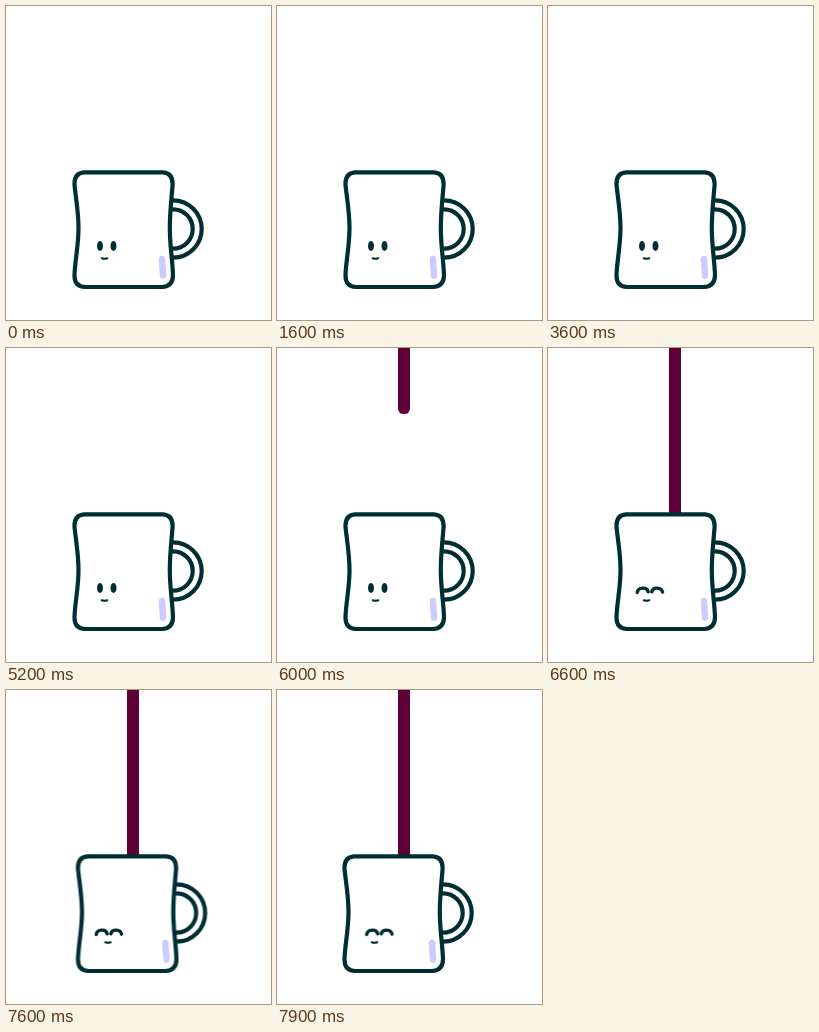
An HTML page without scripts for the animation above (8 s loop, 265x314 px).

```html
<!DOCTYPE html>
<html lang="en">
<head>
<meta charset="utf-8">
<title>Mug and straw</title>
<style>
  html, body { margin: 0; width: 100%; height: 100%; overflow: hidden; background: #fff; }
  svg { display: block; width: 265px; height: 314px; }

  .ink { fill: none; stroke: #002f33; stroke-width: 4.2; stroke-linecap: round; stroke-linejoin: round; }
  .body { fill: #fff; }
  .shine { stroke: #ccccff; stroke-width: 6.5; stroke-linecap: round; }
  .straw { stroke: #5f0038; stroke-width: 12; stroke-linecap: round; }
  .thin { stroke-width: 2; }
  .smile { stroke-width: 3.4; }
  .eyes { fill: #002f33; transform-origin: 101px 240px; }

  .straw, .mug, .gaze, .eyes, .open, .happy { animation: 8s linear infinite; }
  .straw { animation-name: drop; }
  .mug { animation-name: wobble; }
  .gaze { animation-name: gaze; }
  .eyes { animation-name: blink; }
  .open { animation-name: hide; animation-timing-function: step-end; }
  .happy { animation-name: show; animation-timing-function: step-end; }

  @keyframes drop {
    0%, 71.8% { transform: translateY(-8px); }
    75% { transform: translateY(66px); }
    78.75%, 100% { transform: translateY(180px); }
  }
  @keyframes wobble {
    0%, 86.25% { transform: none; }
    88.75% { transform: translateX(-3px); }
    90% { transform: translateX(-2.5px); }
    92.5% { transform: translateX(3.5px); }
    93.75% { transform: translateX(4.8px); }
    95% { transform: translateX(3.5px); }
    97.5% { transform: translateX(-.6px); }
    98.75%, 100% { transform: translateX(-1px); }
  }
  /* The smiling eyes trail the body a little. */
  @keyframes gaze {
    0%, 92% { transform: none; }
    95% { transform: translateX(-2.5px); }
    98.75%, 100% { transform: translateX(1.5px); }
  }
  @keyframes blink {
    0%, 35%, 39.5%, 77.5% { transform: none; }
    36.75%, 37.75% { transform: scaleY(.15); }
    78.75%, 100% { transform: scaleY(.2); }
  }
  @keyframes hide { 0% { opacity: 1; } 78.75%, 100% { opacity: 0; } }
  @keyframes show { 0% { opacity: 0; } 78.75%, 100% { opacity: 1; } }
</style>
</head>
<body>
<svg viewBox="0 0 265 314">
  <line class="straw" x1="127" y1="-300" x2="127" y2="-6"/>
  <g class="mug">
    <circle class="ink body" cx="167" cy="223" r="28.7"/>
    <circle class="ink body" cx="167" cy="223" r="19.7"/>
    <path class="ink body" d="M78 166.3H157Q167 167 166.6 179C165.5 193 163.8 206 163.8 222C163.8 240 166.5 254 167 269Q167 280.5 156 281H79Q68.3 280.5 68.5 269C69 254 72.5 240 72.5 222C72.5 206 70 193 68.5 179Q68 167 78 166.3Z"/>
    <line class="shine" x1="156" y1="253" x2="157" y2="269.5"/>
    <path class="ink thin" d="M95.7 252.2Q98.5 253.2 101.3 252.2"/>
    <g class="open">
      <g class="eyes">
        <ellipse cx="94" cy="240" rx="3" ry="5"/>
        <ellipse cx="107.5" cy="240" rx="3" ry="5"/>
      </g>
    </g>
    <g class="happy">
      <path class="ink smile gaze" d="M89.2 244.6C90 239 99 238.6 100.2 243.8M103.8 243.8C105 238.6 113.5 239 114.6 244.2"/>
    </g>
  </g>
</svg>
</body>
</html>
```
